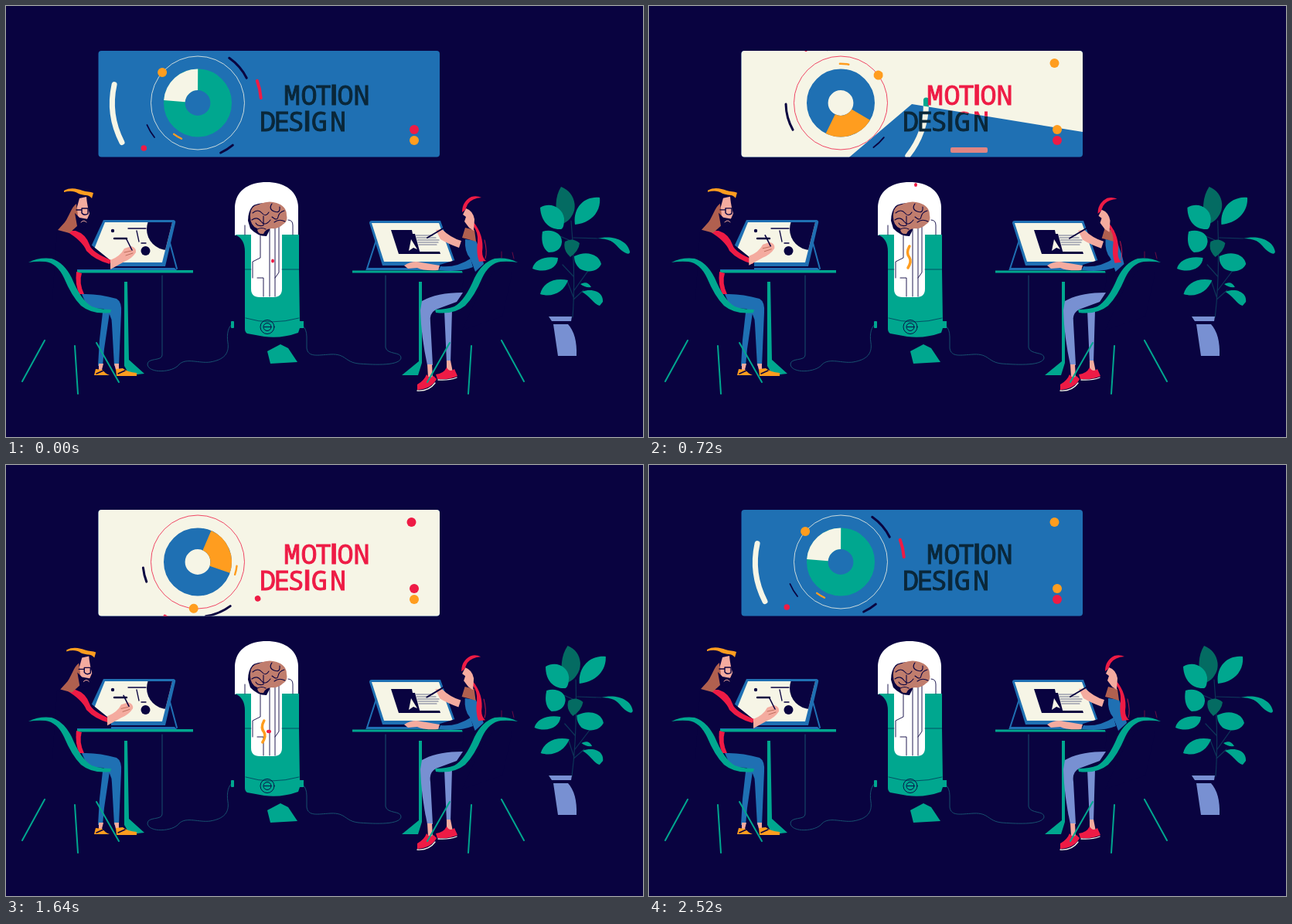
An HTML page that plays this animation: 824x558 px, repeating every 2560 ms.

```html
<!DOCTYPE html>
<html lang="en">
<head>
<meta charset="utf-8">
<title>Motion design studio</title>
<style>
html, body { margin: 0; width: 100%; height: 100%; overflow: hidden; background: #090340; }
svg { display: block; width: 824px; height: 558px; }
.n { fill: #090340 } .b { fill: #1f70b3 } .c { fill: #f6f5e6 } .t { fill: #00a78f }
.g { fill: #046b62 } .r { fill: #ee1b45 } .o { fill: #ff9d1f } .p { fill: #f4ab9f }
.k { fill: #b0604f } .l { fill: #7890d2 } .w { fill: #fff }
.line { fill: none; stroke-linecap: round; stroke-linejoin: round }
.navy { stroke: #090340 } .teal { stroke: #00a78f } .blue { stroke: #1f70b3 }
.cable { stroke: #17506f; stroke-width: 1 }
.title { font: 400 35px "Noto Sans Mono", "DejaVu Sans Mono", monospace; text-anchor: middle; stroke-width: .9 }
.title .i { font-family: Inter, sans-serif; font-weight: 600 }
</style>
</head>
<body>
<svg viewBox="0 0 824 558">
  <defs>
    <clipPath id="board"><rect x="119.500" y="58" width="441.500" height="137.500" rx="4"/></clipPath>
    <clipPath id="sweep"><path id="sector"/></clipPath>
    <clipPath id="screen"><path d="M128 280H215L202 332H107Z"/></clipPath>
    <g id="chair">
      <path class="t" d="M29 332Q43 325 59 327Q75 332 85 352Q97 381 111 389Q121 393 136 393L135 397Q112 400 97 388Q85 376 75 352Q66 333 51 331Q40 330 29 332Z"/>
      <path class="line teal" stroke-width="2" d="M50 433L21 486M89 440L93 502M117 436L146 487"/>
    </g>
  </defs>
  <rect class="n" width="824" height="558"/>

  <g clip-path="url(#board)">
    <g id="cool"></g>
    <g clip-path="url(#sweep)"><g id="warm"></g></g>
    <rect id="bar" x="390" y="183" width="48" height="7" rx="2" fill="#df8583"/>
    <g id="flag"><path class="r" d="M431 80H455Q453 91 443 91Q440 85 431 80Z"/><path class="o" d="M402 68H445L455 80H402Q400 80 400 78V70Q400 68 402 68Z"/></g>
    <circle id="dotA" cx="524.500" cy="74" r="6"/>
    <circle id="dotB" cx="528" cy="160" r="6"/>
    <circle id="dotC" cx="528" cy="174" r="6"/>
  </g>

  <!-- cables -->
  <g class="line cable">
    <path d="M202 349V452C202 460 183 455 183 464C184 476 216 475 224 464C233 455 250 463 264 461C282 458 289 450 287 436C285 424 288 414 293 412"/>
    <path d="M491 349V442C493 452 512 447 511 456C508 467 470 464 456 463C438 461 440 450 420 451C402 452 391 455 389 443V428Q389 418 383 413"/>
  </g>

  <!-- machine -->
  <path class="w" d="M296 297V260C297 239 314 228 337 228S377 239 378 260V297Z"/>
  <path class="t" d="M296 296H379V342L380 408H385V417H380L378 423Q356 431 334 428L312 424Q309 422 309 418V318Q309 301 296 296Z"/>
  <path class="w" d="M317 292H357V366Q357 377 346 377H328Q317 377 317 366Z"/>
  <g class="line navy" stroke-width=".9">
    <path d="M309 341H317M357 341H379M310 404Q343 414 379 404" opacity=".6"/>
    <path d="M341 288V376M348 286V376M353 284V345L348 352M329 295V326L319 331V352M325 352H333V376M365 277Q371 277 371 284V296M309 284V296"/>
    <circle cx="338" cy="415.500" r="9"/><circle cx="338" cy="415.500" r="5"/><path d="M334 415.500H342"/>
  </g>
  <rect class="t" x="291" y="408" width="4" height="9" rx="1"/>
  <path class="t" d="M338 447L355 438L365 443L377 461L342 463Z"/>
  <path id="bolt" class="line" stroke="#ff9d1f" stroke-width="3.500" d="M1-14Q-4-5 1 1Q4 6-1 14"/>
  <path class="n" d="M313 278Q313 266 319 259Q325 255 337 255L341 290L337 298Q325 298 316 288Z"/>
  <path fill="#c07d6d" d="M316 270Q316 259 327 257Q339 251 350 255Q363 259 363 271Q365 279 358 283Q352 289 344 288Q336 288 333 295Q325 296 325 288Q315 284 316 270Z"/>
  <path class="line navy" stroke-width="1.100" d="M319 268Q326 262 331 268T340 267M344 256Q339 263 347 266T354 260M360 265Q353 267 352 273T344 273M318 277Q325 272 330 279T342 277M347 280Q353 275 361 279M333 272V284Q326 286 323 281M325 289Q331 286 336 289"/>
  <ellipse id="sparkA" class="r" cx="345" rx="2" ry="2.500"/>
  <ellipse id="sparkB" class="r" cx="340" rx="3" ry="2.200"/>
  <path id="sparkC" class="line teal" stroke-width="1.500" d="M361 248Q363 253 359 258"/>

  <!-- left workplace -->
  <path class="b" d="M126 277H217Q220 278 219 281L206 337H104L107 318Z"/>
  <path class="line blue" stroke-width="2" d="M211 303L221 340"/>
  <g clip-path="url(#screen)">
    <rect class="c" x="100" y="280" width="120" height="54"/>
    <circle class="n" cx="209" cy="289" r="27"/>
    <circle class="n" cx="138" cy="291" r="2.200"/><circle class="n" cx="180.500" cy="317" r="6"/>
    <path class="line navy" stroke-width="1.300" d="M158 288H181M169 291L172 305M175 307H181"/>
    <path class="line navy" stroke-width="2.400" d="M140 301H156"/>
  </g>
  <path class="b" d="M92 339H218L221 342H92Z"/>
  <path class="t" d="M92 342H242V345.500H92ZM153 357H157L159 458L179 476L160 478L153 466Z"/>
  <path class="n" d="M66 292L105 305L136 330V341H92L88 380H60Z"/>
  <path class="r" d="M77 291H90Q103 295 108 309Q111 319 136 329L134 334Q115 329 104 317Q99 304 77 291ZM91 344L98 346Q94 358 101 373H95Q89 361 91 344Z"/>
  <g id="hand">
    <path class="p" d="M135 329Q148 324 153 314L162 311Q169 313 168 319Q163 327 153 331L135 341Z"/>
    <path class="line navy" stroke-width="1.600" d="M156 302L163 316"/>
    <path class="line" stroke="#b0604f" stroke-width=".8" d="M153 319L162 317M155 323L164 320"/>
  </g>
  <g id="head">
    <path class="k" d="M91 256C84 261 82 272 76 280L67 290L82 294L93 284Z"/>
    <path class="p" d="M95 249L104 247Q105 259 108 269L104 278L95 276L90 267Z"/>
    <path class="k" d="M92 261Q86 260 89 269L93 273Z"/>
    <path class="n" d="M89 268L95 274L106 276L105 284Q99 290 92 285Z"/>
    <path class="line navy" stroke-width="1.400" d="M91 264L98 264M98 262H106V269Q101 272 98 268Z"/>
    <path class="line" stroke="#f4ab9f" stroke-width="1" d="M97 280Q101 276 104 280"/>
    <path class="o" d="M75 239C84 234 93 237 99 239C104 241 109 240 113 242L111 249C107 243 100 246 94 243C88 239 82 239 75 241Z"/>
  </g>
  <path class="b" d="M98 373Q119 372 143 379Q150 383 149 397L146 466H140L137 412Q137 398 126 392L106 391Z"/>
  <path class="b" d="M134 397L127 444L125 466H119L121 432L125 397Z"/>
  <path class="p" d="M120 463H126L124 471H120ZM140 463H146V471H142Z"/>
  <path class="o" d="M116 470L125 471Q128 476 134 478H114ZM142 470L151 469Q157 474 169 475V479H143Z"/>
  <path class="line navy" stroke-width="1.500" d="M117 476L126 472M145 476L154 472"/>
  <use href="#chair"/>

  <!-- right workplace -->
  <path class="b" d="M470 281Q470 278 473 278H562L581 331L577 336H487Z"/>
  <path class="line blue" stroke-width="2" d="M479 303L467 340"/>
  <path class="c" d="M473 281H560L578 331H489Z"/>
  <path class="n" d="M498 290H525L526 295H529L536 321H508ZM531 318H561L562 321H533Z"/>
  <path class="c" d="M524 302L532 315L527 313L521 317Z"/>
  <path class="line" stroke="#6d7290" stroke-width="1.200" d="M530 297H552M531 300H556M532 303H560M533 306H559M534 309H557"/>
  <path class="b" d="M467 339H590V342H465Z"/>
  <path class="t" d="M448 342.500H598V345.500H448ZM534 357H538V462L533 478H512L534 460Z"/>
  <path class="n" d="M584 306L608 296L626 330L612 372H588Q594 353 590 343L560 342L561 335L581 329Z"/>
  <path class="p" d="M515 336Q526 329 537 332L561 336L559 342Q540 343 532 339L520 340Z"/>
  <path class="b" d="M601 327Q583 339 562 337L560 342Q587 345 604 338Z"/>
  <path id="strap" class="b" d="M594 302L608 304Q614 316 618 334L607 344Q604 335 600 326Q593 318 594 302Z"/>
  <path id="shoulder" class="k" d="M594 287L606 290L608 305L598 302L590 300Z"/>
  <g id="grip">
    <path class="p" d="M556 290L564 289Q575 300 589 304L586 313Q572 308 562 302Z"/>
    <path class="line navy" stroke-width="2" d="M545 300L567 287"/>
  </g>
  <g id="woman">
    <path class="r" d="M604 279C614 290 618 305 616 318Q616 326 621 330L612 331Q608 320 610 305Q611 293 604 284Z"/>
    <path class="line" stroke="#ee1b45" stroke-width=".8" d="M619 303Q623 318 620 327"/>
    <path class="p" d="M595 262Q604 265 606 276L605 291L599 287L593 279L595 273L591 270Z"/>
    <path class="r" d="M590 267Q590 253 602 247Q609 245 615 248Q602 249 597 257L594 264Z"/>
  </g>
  <path class="line" stroke="#ee1b45" stroke-width=".7" d="M641 318V326M655 319L657 327" opacity=".6"/>
  <path class="l" d="M538 382Q557 371 591 371L583 383L556 393Q547 398 549 410L552 465H545Q537 428 536 394ZM567 394H577L575 462H570Z"/>
  <path class="p" d="M545 464H551L552 483L546 481ZM570 459H575L578 474H570Z"/>
  <path class="r" d="M532 490Q541 485 544 477Q548 483 553 479L557 483Q550 496 532 497ZM556 477Q566 476 570 468Q574 475 580 470L584 479Q575 484 558 483Z"/>
  <path class="line" stroke="#f6f5e6" stroke-width="1.300" d="M532 498Q547 499 555 488M559 484Q573 485 583 481"/>
  <path class="n" d="M613 369L639 333L655 345L642 402L590 420Z"/>
  <use href="#chair" transform="translate(691 0) scale(-1 1)"/>

  <!-- plant -->
  <g id="plant">
    <path class="line" stroke="#0d3558" stroke-width="1.200" d="M733 403Q737 350 731 278M734 350L720 335M735 368L765 326M733 305L707 294M734 300L765 301M734 377L726 356M734 380L747 368"/>
    <path class="g" d="M718 234C731 239 738 252 735 265C731 277 724 281 717 283C710 270 709 248 718 234ZM723 305Q733 299 742 307Q741 317 730 325Q720 316 723 305Z"/>
    <path class="t" d="M691 261C703 253 720 260 722 275C722 283 721 288 718 289C704 290 692 280 691 261ZM768 248C770 266 757 281 736 283C733 263 746 246 768 248ZM694 292C706 288 720 294 719 306C718 316 710 319 702 319C694 314 692 303 694 292ZM735 324C750 316 767 321 770 334C766 344 752 346 742 340C737 335 735 330 735 324Z"/>
    <path class="t" d="M681 340C683 329 697 323 714 326C714 339 698 347 681 340ZM765 301C784 296 804 303 807 318Q807 322 802 320C794 317 790 308 782 304Q775 301 765 301ZM691 373C694 359 708 351 727 355C722 370 707 378 691 373ZM745 370C758 365 773 370 772 383L768 388C760 386 757 377 745 370ZM743 360Q752 355 757 364Q749 365 743 360Z"/>
  </g>
  <path class="l" d="M702 402H732L731 408H706ZM708 412H727Q739 425 738 453H714Z"/>
</svg>
<script>
const $ = id => document.getElementById(id);
const LOOP = 2560, SPIN = 2520, CX = 248, CY = 125.5, RAD = Math.PI / 180;
const NAVY = '#090340', BLUE = '#1f70b3', CREAM = '#f6f5e6', TEAL = '#00a78f', RED = '#ee1b45', ORANGE = '#ff9d1f';

const at = (x, y, r, a) => `${(x + r * Math.cos(a * RAD)).toFixed(2)} ${(y + r * Math.sin(a * RAD)).toFixed(2)}`;
const arc = (turns, r, mid, half, color, width, cap = 'round') =>
  `<path data-turns="${turns}" d="M${at(CX, CY, r, mid - half)}A${r} ${r} 0 0 1 ${at(CX, CY, r, mid + half)}"
    fill="none" stroke="${color}" stroke-width="${width}" stroke-linecap="${cap}"/>`;
const dot = (turns, r, a, size, color) => {
  const [x, y] = at(CX, CY, r, a).split(' ');
  return `<circle data-turns="${turns}" cx="${x}" cy="${y}" r="${size}" fill="${color}"/>`;
};
const word = (text, y, xs) => `<text class="title" y="${y}">` +
  [...text].map((ch, i) => `<tspan${ch === 'I' ? ' class="i"' : ''} x="${xs[i]}">${ch}</tspan>`).join('') + '</text>';

// The same board in two colour schemes; the sweep reveals one over the other.
function board({ back, base, slice, ring, big, ink }) {
  return `<rect x="119" y="57" width="443" height="140" fill="${back}"/>
    <circle cx="${CX}" cy="${CY}" r="30.2" fill="none" stroke="${base}" stroke-width="27.600"/>` +
    arc(2, 30.2, 227.5, 42.8, slice, 27.6, 'butt') +
    `<circle cx="${CX}" cy="${CY}" r="60.5" fill="none" stroke="${ring}" stroke-width=".8"/>` +
    arc(2, 110.5, 172.5, 20, big, 7) +
    arc(2, 71, -41, 14, NAVY, 3) +
    arc(2, 71, 57.8, 7.5, NAVY, 3) +
    arc(-1, 71.5, 149, 7.5, NAVY, 1.8) +
    arc(-2, 50.8, 120.9, 6.5, ORANGE, 2.4) +
    arc(-1, 82, -12.5, 8, RED, 4) +
    dot(-2, 91, 140, 3.8, RED) +
    dot(1, 60.5, -139.3, 6, ORANGE) +
    `<g fill="${ink}" stroke="${ink}">` +
    word('MOTION', 127.5, [370, 392, 410.5, 424, 439, 460]) +
    word('DESIGN', 162, [338.5, 357, 375, 389.5, 405.5, 429.5]) + '</g>';
}
$('cool').innerHTML = board({ back: BLUE, base: TEAL, slice: CREAM, ring: CREAM, big: CREAM, ink: '#0a2739' });
$('warm').innerHTML = board({ back: CREAM, base: BLUE, slice: ORANGE, ring: RED, big: TEAL, ink: RED });
const spinners = [...document.querySelectorAll('[data-turns]')];

const ease = u => (1 - Math.cos(Math.PI * Math.min(1, Math.max(0, u)))) / 2;
const between = (t, a, b) => t >= a && t < b;
const show = (id, on) => $(id).setAttribute('visibility', on ? 'visible' : 'hidden');
const move = (id, x, y) => $(id).setAttribute('transform', `translate(${x.toFixed(2)} ${y.toFixed(2)})`);

function sector(from, to) {
  let d = 'M340 127';
  for (let i = 0; i <= 12; i++) d += 'L' + at(340, 127, 600, from + (to - from) * i / 12);
  $('sector').setAttribute('d', d + 'Z');
}

function sparkle(id, y, on) {
  $(id).setAttribute('cy', y.toFixed(1));
  show(id, on);
}

function draw(t) {
  const u = Math.min(1, t / SPIN), turn = u * 2 * Math.PI;
  for (const el of spinners) el.setAttribute('transform', `rotate(${(u * 360 * el.dataset.turns).toFixed(2)} ${CX} ${CY})`);

  const p = ease((t - 18) / 1192), q = ease((t - 1715) / 800);
  if (q > 0) sector(78.7 + 720 * q, 438.7 + 360 * q);
  else sector(-90 + 360 * p, -90 + 720 * p);

  show('dotA', t >= 40);
  $('dotA').setAttribute('fill', between(t, 600, 840) || t >= 2240 ? ORANGE : RED);
  const swap = between(t, 40, 840) || t >= 1680;
  $('dotB').setAttribute('fill', swap ? ORANGE : RED);
  $('dotC').setAttribute('fill', swap ? RED : ORANGE);
  show('bar', between(t, 640, 800));
  show('flag', between(t, 1000, 1160));

  // light pulses rising through the tube
  const second = t > 1400;
  move('bolt', 334 + 2 * Math.sin(t / 90), second ? 345 - (t - 1640) * .19 : 365 - (t - 440) * .143);
  show('bolt', between(t, 400, 1010) || between(t, 1510, 1990));
  sparkle('sparkA', 330 - .137 * t, t < 740);
  sparkle('sparkB', 345 - .15 * (t - 1640), between(t, 1440, 2000));
  show('sparkC', between(t, 1840, 2000));

  // people and plant
  move('head', 1 + 2.3 * Math.sin(2 * turn - .44), .4 * Math.sin(2 * turn));
  const draft = (1 - Math.cos(2 * turn)) / 2;
  move('hand', -6 * draft, -5.5 * draft);
  const lean = between(t, 60, 1800) ? (1 - Math.cos((t - 60) / 1740 * 2 * Math.PI)) / 2 : 0;
  move('woman', -11 * lean, 2 * lean);
  move('shoulder', -5 * lean, lean);
  move('strap', -4 * lean, 0);
  move('grip', -draft, draft * .8);
  const sway = -4.1 * (1 - Math.cos(turn)) / 2;
  $('plant').setAttribute('transform', `translate(0 385) skewX(${sway.toFixed(3)}) translate(0 -385)`);
}

const start = performance.now();
function tick() {
  const t = (performance.now() - start) % LOOP;
  draw(Math.floor(t / 40) * 40);
  requestAnimationFrame(tick);
}
draw(0);
requestAnimationFrame(tick);
</script>
</body>
</html>
```
